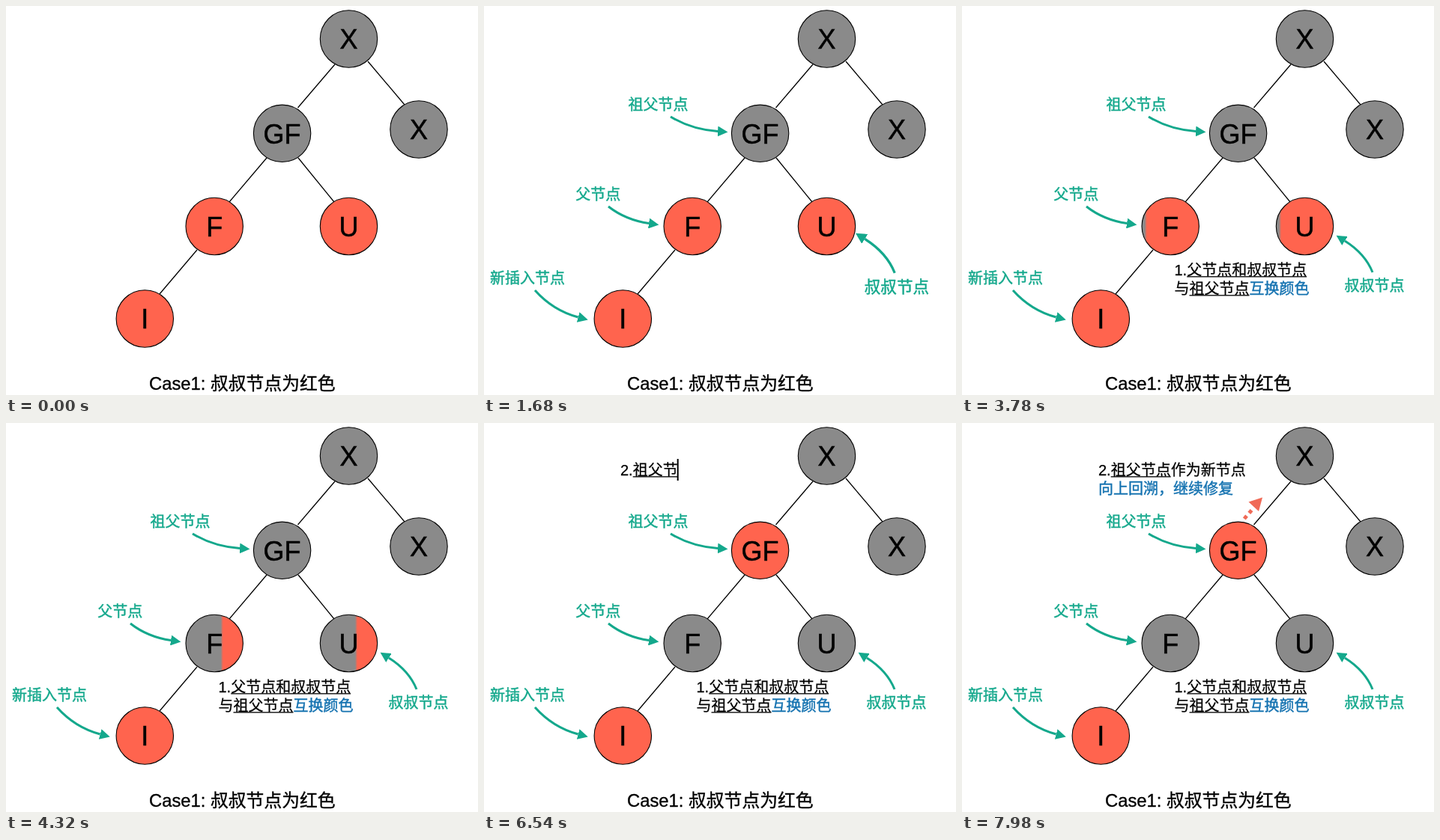
An HTML page that plays this animation: 630x520 px, repeating every 8 s.

```html
<!DOCTYPE html>
<html lang="zh-CN">
<head>
<meta charset="utf-8">
<title>Case1</title>
<style>
  html, body { margin: 0; width: 100%; height: 100%; overflow: hidden; background: #fff; }
  svg { display: block; width: 630px; height: 520px; font: 20px 'Liberation Sans', 'Noto Sans CJK SC', 'Noto Sans CJK', sans-serif; }
  text { white-space: pre; }
  .edge { stroke: #000; stroke-width: 1.3; }
  .node { stroke: #000; stroke-width: 1.1; }
  .letter { font-size: 36px; text-anchor: middle; stroke: #000; stroke-width: .5; }
  .caption { font-size: 23.8px; stroke: #000; stroke-width: .35; }
  .label { fill: #14a88c; stroke: #14a88c; stroke-width: .45; }
  .plain, .underline { stroke: #000; stroke-width: .25; }
  .blue { fill: #1673b1; stroke: #1673b1; stroke-width: .45; }
  .arrow { fill: none; stroke: #14a88c; stroke-width: 3; }
</style>
</head>
<body>
<svg id="stage" viewBox="0 0 630 520">
  <defs>
    <marker id="head" markerUnits="userSpaceOnUse" markerWidth="14" markerHeight="14" refX="0" refY="7" orient="auto">
      <path d="M0 0L13.5 7L0 14Z" fill="#14a88c"/>
    </marker>
    <linearGradient id="toGrey"><stop stop-color="#8a8a8a"/><stop stop-color="#ff644e"/></linearGradient>
    <linearGradient id="toRed"><stop stop-color="#ff644e"/><stop stop-color="#8a8a8a"/></linearGradient>
    <clipPath id="reveal"><rect id="revealBox" x="370" width="40" height="34"/></clipPath>
  </defs>
  <text class="caption" x="191" y="512.5">Case1: 叔叔节点为红色</text>
  <g clip-path="url(#reveal)" fill="#f06a57">
    <path d="M376.8 128L389.8 112.8" stroke="#f06a57" stroke-width="5" stroke-dasharray="5"/>
    <path d="M401 99.5L382.5 105.5L396 118Z"/>
  </g>
</svg>
<script>
const LOOP = 8000, GREY = '#8a8a8a', RED = '#ff644e', SIZE = 20;
const stage = document.getElementById('stage');
const clamp = v => Math.min(1, Math.max(0, v));
const progress = (t, start, duration) => clamp((t - start) / duration);

function add(tag, attrs, parent = stage, content = '') {
  const el = document.createElementNS('http://www.w3.org/2000/svg', tag);
  for (const key in attrs) el.setAttribute(key, attrs[key]);
  el.textContent = content;
  parent.append(el);
  return el;
}

// Tree
[[439, 78, 389.5, 136], [483, 74, 532, 132], [348, 203, 298, 262], [390, 203, 438, 262], [255, 326, 205, 385]]
  .forEach(([x1, y1, x2, y2]) => add('line', { class: 'edge', x1, y1, x2, y2 }));

[['X', 457.5, 44, GREY], ['X', 551, 165, GREY], ['GF', 368.6, 170.3, 'url(#toRed)'],
 ['F', 278.2, 294.5, 'url(#toGrey)'], ['U', 457.5, 294.5, 'url(#toGrey)'], ['I', 185.3, 418, RED]]
  .forEach(([name, cx, cy, fill]) => {
    add('circle', { class: 'node', cx, cy, r: 38.2, fill });
    add('text', { class: 'letter', x: cx, y: cy + 13.3 }, stage, name);
  });

// Labels that pop in around their own centre
const labels = [
  { text: '新插入节点', x: 8, y: 370.5, arrow: 'M68 380Q92 407 125.7 416', cx: 74, cy: 389, start: 200 },
  { text: '父节点', x: 122.3, y: 258.5, arrow: 'M166 268Q189 286 220 290.5', cx: 179, cy: 267, start: 600 },
  { text: '祖父节点', x: 192.5, y: 138.5, arrow: 'M249 148Q277 165 312 167.5', cx: 260, cy: 147, start: 1000 },
  { text: '叔叔节点', x: 510.5, y: 380.5, arrow: 'M548 356Q538 331 511 314', cx: 545, cy: 346, start: 1400 }
];
for (const label of labels) {
  label.group = add('g', {});
  add('path', { class: 'arrow', d: label.arrow, 'marker-end': 'url(#head)' }, label.group);
  add('text', { class: 'label', x: label.x, y: label.y }, label.group, label.text);
}

// Typed notes: each line is a list of [text, style]
const notes = [
  { x: 283.5, y: 353, start: 1800, lines: [
    [['1.'], ['父节点和叔叔节点', 'underline']],
    [['与'], ['祖父节点', 'underline'], ['互换颜色', 'blue']]] },
  { x: 182, y: 63, start: 6180, lines: [
    [['2.'], ['祖父节点', 'underline'], ['作为新节点']],
    [['向上回溯\uff0c继续修复', 'blue']]] }
];
const widthOf = text => [...text].reduce((w, c) => w + (c === '.' ? .278 : c < '~' ? .556 : 1) * SIZE, 0);
for (const note of notes) {
  note.runs = [];
  note.lines.forEach((line, row) => {
    let x = note.x;
    const y = note.y + row * 25;
    for (const [text, style = 'plain'] of line) {
      const el = add('text', { class: style, x, y: y + 7 });
      const rule = style === 'underline' && add('rect', { x, y: y + 8.2, height: 1.3 });
      note.runs.push({ text, x, y, el, rule });
      x += widthOf(text);
    }
  });
  note.length = note.runs.reduce((n, run) => n + run.text.length, 0);
  note.caret = add('rect', { width: 2, height: 29 });
}

function type(note, t) {
  const typed = Math.floor((t - note.start) / 70);
  let left = Math.max(0, typed);
  for (const { text, x, y, el, rule } of note.runs) {
    const shown = text.slice(0, left);
    const width = widthOf(shown);
    el.textContent = shown;
    if (rule) rule.setAttribute('width', width);
    if (shown) {
      note.caret.setAttribute('x', x + width - 1);
      note.caret.setAttribute('y', y - 15);
    }
    left = Math.max(0, left - text.length);
  }
  note.caret.setAttribute('visibility', typed > 0 && typed < note.length ? 'visible' : 'hidden');
}

function wipe(id, p) {
  const [from, to] = document.getElementById(id).children;
  from.setAttribute('offset', clamp(p * 1.04 - .04));
  to.setAttribute('offset', clamp(p * 1.04));
}

function easeOutBack(u) {
  const s = 1.70158, v = u - 1;
  return 1 + (s + 1) * v ** 3 + s * v ** 2;
}

function draw(t) {
  for (const { group, cx, cy, start } of labels) {
    const u = progress(t, start, 400);
    group.setAttribute('visibility', u > 0 ? 'visible' : 'hidden');
    group.setAttribute('transform', `translate(${cx} ${cy}) scale(${Math.max(.001, easeOutBack(u))}) translate(${-cx} ${-cy})`);
  }
  notes.forEach(note => type(note, t));
  wipe('toGrey', progress(t, 3695, 1000));
  wipe('toRed', progress(t, 4745, 1000));
  document.getElementById('revealBox').setAttribute('y', 132 - 34 * progress(t, 7640, 300));
}

const origin = performance.now();
function frame() {
  draw((performance.now() - origin) % LOOP);
  requestAnimationFrame(frame);
}
draw(0);
requestAnimationFrame(frame);
</script>
</body>
</html>
```
